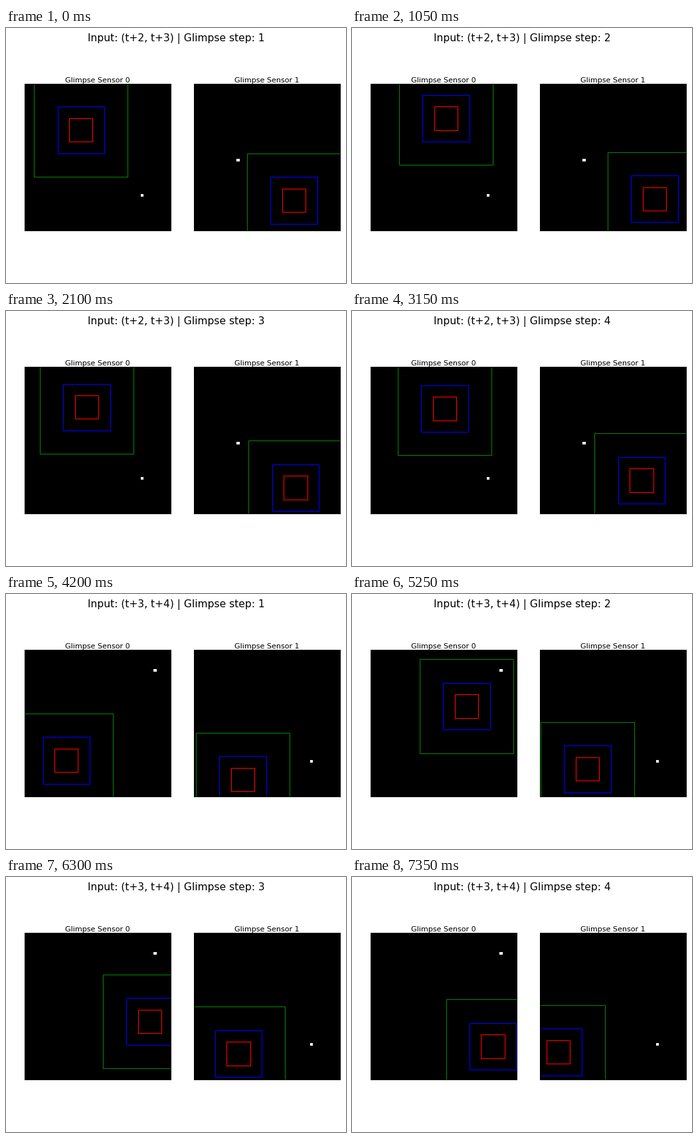
A matplotlib script that plays this animation: 512x384 px, repeating every 8 s.

```python
import numpy as np
import matplotlib.pyplot as plt
from matplotlib.animation import FuncAnimation
from matplotlib.patches import Rectangle

W, H, DPI = 512, 384, 80
STEP_MS, TICK_MS, LOOP_MS = 1050, 50, 8000
GRID, SIDE, TOP = 100, 220.35, 84.17
LEFTS = (28.03, 282.76)
SCALES = ((16, "red"), (32, "blue"), (64, "green"))

# Glimpse centres (x, y) per step, and the dot's top-left cell, for each sensor
INPUTS = [
    dict(label="(t+2, t+3)",
         dots=((79, 75), (29, 51)),
         steps=(((38, 31), (68, 79)), ((51, 23), (78, 78)),
                ((42, 27), (69, 82)), ((50, 28), (69, 77)))),
    dict(label="(t+3, t+4)",
         dots=((88, 13), (79, 75)),
         steps=(((28, 75), (33, 88)), ((65, 38), (32, 81)),
                ((85, 60), (30, 82)), ((83, 77), (12, 81)))),
]

plt.rcParams["font.family"] = "DejaVu Sans"
fig = plt.figure(figsize=(W / DPI, H / DPI), dpi=DPI, facecolor="white")
title = fig.suptitle("", fontsize=14)


def scene(dot):
    img = np.zeros((GRID, GRID))
    x, y = dot
    img[y:y + 2, x:x + 2] = 1
    return img


def make_sensor(i, left):
    ax = fig.add_axes([left / W, 1 - (TOP + SIDE) / H, SIDE / W, SIDE / H])
    img = ax.imshow(scene((0, 0)), cmap="gray", vmin=0, vmax=1,
                    interpolation="nearest", aspect="auto")
    ax.set_xticks([])
    ax.set_yticks([])
    ax.set_title(f"Glimpse Sensor {i}", fontsize=10, pad=2)
    boxes = [ax.add_patch(Rectangle((0, 0), s, s, fill=False, ec=c, lw=1))
             for s, c in SCALES]
    return img, boxes


sensors = [make_sensor(i, left) for i, left in enumerate(LEFTS)]


def update(frame):
    n, step = divmod(frame * TICK_MS // STEP_MS, 4)
    data = INPUTS[n]
    title.set_text(f"Input: {data['label']} | Glimpse step: {step + 1}")
    for (img, boxes), dot, (cx, cy) in zip(sensors, data["dots"], data["steps"][step]):
        img.set_data(scene(dot))
        for box, (size, _) in zip(boxes, SCALES):
            box.set_xy((cx - size / 2, cy - size / 2))
    return []


anim = FuncAnimation(fig, update, frames=LOOP_MS // TICK_MS, interval=TICK_MS,
                     init_func=lambda: update(0), repeat=True, repeat_delay=0)
plt.show()
```
